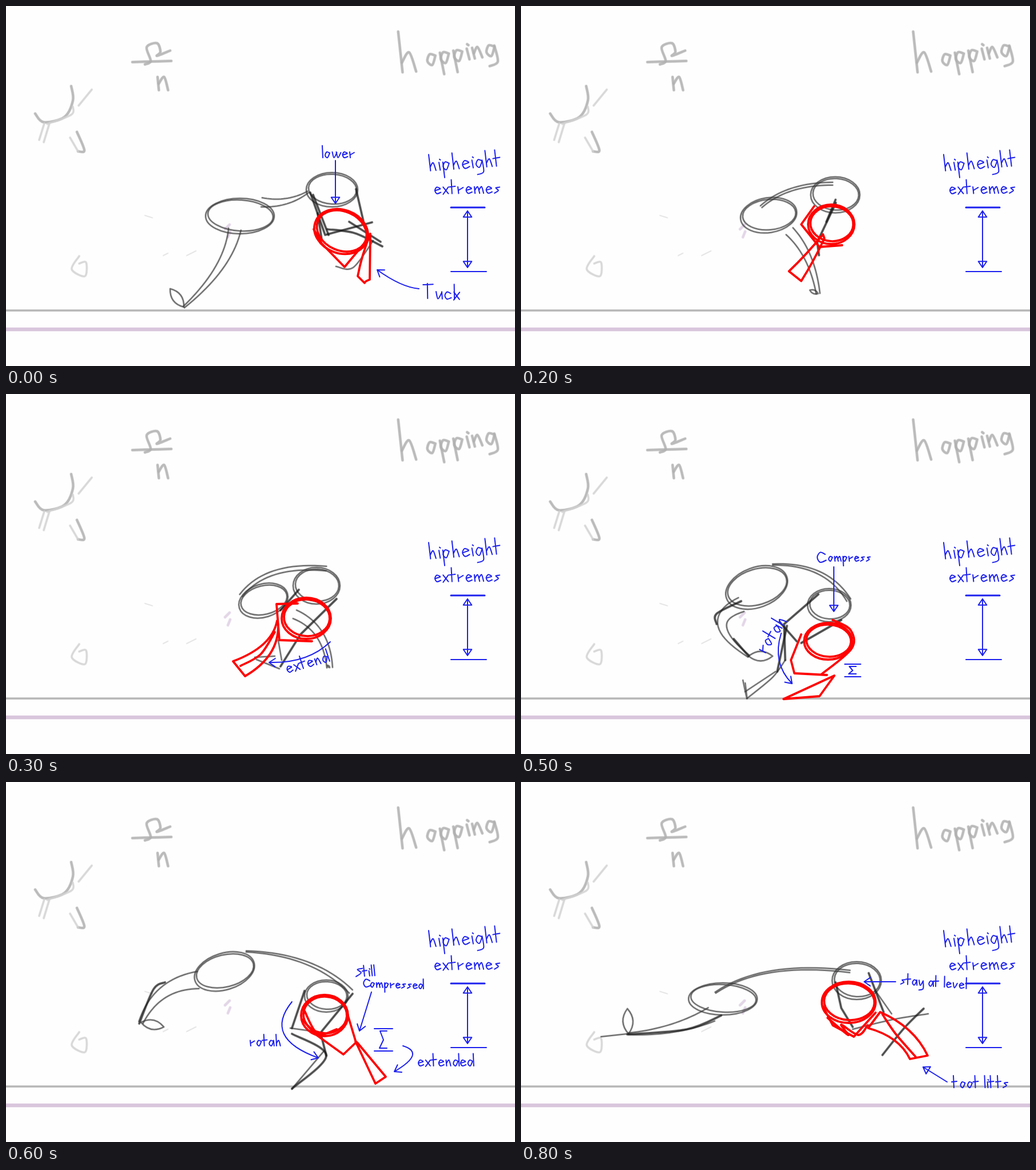
Recreate the animation shown at these times as an HTML page with a canvas. Size 890 by 629 pixels, loop 900 ms.

```html
<!DOCTYPE html>
<html lang="en">
<head>
<meta charset="utf-8">
<title>Hopping study</title>
<style>
html, body { margin: 0; width: 100%; height: 100%; overflow: hidden; background: #fefefe; }
canvas { display: block; width: 100%; height: 100%; }
</style>
</head>
<body>
<canvas id="stage" width="890" height="629" role="img" aria-label="Sketch of a hop cycle with handwritten notes"></canvas>
<script>
const ctx = document.getElementById('stage').getContext('2d');
const STEP = 100;

const pen = (color, width, soft = true) => ({ color, width, soft });
const PENCIL = pen('rgba(55,55,55,.82)', 2);
const DARK = pen('rgba(25,25,25,.85)', 3.2);
const FAINT = pen('#d2d2d2', 3);
const GREY = pen('#b0b0b0', 4);
const RED = pen('#ff0000', 3.8, false);
const BLUE = pen('#1c20ee', 2, false);

function ink(tool, path, scale = 1) {
  ctx.beginPath();
  path();
  ctx.strokeStyle = tool.color;
  ctx.lineWidth = tool.width / scale;
  ctx.globalAlpha = tool.soft ? .8 : 1;
  ctx.stroke();
  if (tool.soft) {
    ctx.lineWidth += 1.6 / scale;
    ctx.globalAlpha = .3;
    ctx.stroke();
  }
  ctx.globalAlpha = 1;
}

// Smooth curve through the points of each stroke, strokes split by "/"
function curve(tool, strokes, scale) {
  for (const stroke of strokes.split('/')) {
    const n = stroke.split(' ').map(Number);
    const at = i => {
      const k = Math.max(0, Math.min(n.length / 2 - 1, i));
      return [n[2 * k], n[2 * k + 1]];
    };
    ink(tool, () => {
      ctx.moveTo(...at(0));
      for (let i = 1; i < n.length / 2; i++) {
        const [o, a, b, c] = [at(i - 2), at(i - 1), at(i), at(i + 1)];
        ctx.bezierCurveTo(a[0] + (b[0] - o[0]) / 6, a[1] + (b[1] - o[1]) / 6,
          b[0] - (c[0] - a[0]) / 6, b[1] - (c[1] - a[1]) / 6, ...b);
      }
    }, scale);
  }
}

function line(tool, n) {
  ink(tool, () => {
    for (let i = 0; i < n.length; i += 2) ctx.lineTo(n[i], n[i + 1]);
  });
}

function ring(tool, [x, y, rx, ry, turn]) {
  ink(tool, () => ctx.ellipse(x, y, rx, ry, turn, 0, 7));
  ink(tool, () => ctx.ellipse(x + 1, y - 1, rx - 3, ry - 4, turn + .06, 0, 7));
}

// Two sides of a tapering limb bent through its middle point
function limb(tool, [x0, y0, mx, my, x1, y1, w0, w1]) {
  const cx = 2 * mx - (x0 + x1) / 2, cy = 2 * my - (y0 + y1) / 2;
  for (const side of [-.5, .5]) {
    ink(tool, () => {
      for (let t = 0; t <= 1.001; t += .05) {
        const u = 1 - t;
        const dx = u * (cx - x0) + t * (x1 - cx), dy = u * (cy - y0) + t * (y1 - cy);
        const w = side * (w0 * u + w1 * t) / Math.hypot(dx, dy);
        ctx.lineTo(u * u * x0 + 2 * u * t * cx + t * t * x1 - dy * w,
          u * u * y0 + 2 * u * t * cy + t * t * y1 + dx * w);
      }
    });
  }
}

// Closed blade whose long edges are both pushed by (sx, sy)
function blade(tool, [ax, ay, bx, by, cx, cy, dx, dy, sx, sy]) {
  ink(tool, () => {
    ctx.moveTo(ax, ay);
    ctx.quadraticCurveTo((ax + bx) / 2 + sx, (ay + by) / 2 + sy, bx, by);
    ctx.lineTo(cx, cy);
    ctx.quadraticCurveTo((cx + dx) / 2 + sx, (cy + dy) / 2 + sy, dx, dy);
    ctx.closePath();
  });
}

function paw(tool, x, y, [tx, ty]) {
  const nx = (ty - y) * .4, ny = (x - tx) * .4;
  ink(tool, () => {
    ctx.moveTo(x, y);
    ctx.quadraticCurveTo((x + tx) / 2 + nx, (y + ty) / 2 + ny, tx, ty);
    ctx.quadraticCurveTo((x + tx) / 2 - nx, (y + ty) / 2 - ny, x, y);
  });
}

function arrow([x0, y0, x1, y1, sx = 0, sy = 0, closed = false]) {
  const cx = (x0 + x1) / 2 + sx, cy = (y0 + y1) / 2 + sy;
  const turn = Math.atan2(y1 - cy, x1 - cx);
  const barb = a => [x1 - 13 * Math.cos(turn + a), y1 - 13 * Math.sin(turn + a)];
  ink(BLUE, () => {
    ctx.moveTo(x0, y0);
    ctx.quadraticCurveTo(cx, cy, x1, y1);
    ctx.moveTo(...barb(.6));
    ctx.lineTo(x1, y1);
    ctx.lineTo(...barb(-.6));
    if (closed) ctx.closePath();
  });
}

// Handwriting: a few pen parts on a baseline at 0 make up all letters
const PARTS = {
  bowl: '8 -8 3 -10 0 -4 4 0 8 -8', open: '8 -8 3 -10 0 -5 3 0 9 -2',
  left: '0 -10 1 0', right: '8 -10 9 0', tall: '0 -21 1 0', drop: '0 -10 1 10',
  hook: '8 -9 9 6 1 9', hump: '1 -5 5 -10 8 0', cup: '0 -10 3 0 8 -9',
  bar: '1 -5 8 -7', dot: '1 -14 2 -13', tick: '1 -5 8 -9', cross: '-3 -10 6 -11',
  slash: '8 -10 0 1', back: '0 -10 8 0', ess: '8 -9 2 -8 6 -4 0 0',
  belly: '0 -20 10 -11 0 0', roof: '-6 -19 8 -20'
};
const LETTERS = {
  a: 'bowl right', c: 'open', d: 'bowl tall>9', e: 'bar open', f: 'tall cross',
  g: 'bowl hook', h: 'tall hump', i: 'left dot', k: 'tall slash back', l: 'tall',
  m: 'left hump hump>6', n: 'left hump', o: 'bowl', p: 'drop bowl', r: 'left tick',
  s: 'ess', t: 'tall cross', u: 'cup right', v: 'cup', w: 'cup cup>7', x: 'back slash',
  y: 'cup hook', D: 'tall belly', T: 'tall roof'
};
const advance = c => 'il'.includes(c) ? 5 : 'mw'.includes(c) ? 18 : c === 't' ? 10 : 12.5;

function write([text, x, y, size = 1, turn = 0], tool = BLUE) {
  ctx.save();
  ctx.translate(x, y);
  ctx.rotate(turn);
  ctx.scale(size, size);
  for (const c of text) {
    const big = 'CS'.includes(c) ? 1.7 : 1;
    ctx.save();
    ctx.scale(big, big);
    for (const part of (LETTERS[big > 1 ? c.toLowerCase() : c] || '').split(' ').filter(Boolean)) {
      const [name, shift = 0] = part.split('>');
      ctx.save();
      ctx.translate(+shift, 0);
      curve(tool, PARTS[name], size * big);
      ctx.restore();
    }
    ctx.restore();
    ctx.translate(c === ' ' ? 7 : advance(c) * (big > 1 ? 1.25 : 1), 0);
  }
  ctx.restore();
}

function backdrop() {
  ctx.fillStyle = '#fefefe';
  ctx.fillRect(0, 0, 890, 629);
  write(['h', 690, 116, 3.4, -.06], GREY);
  write(['opping', 738, 104, 1.9, -.15], GREY);
  // margin doodles
  curve(GREY, '243 102 253 96 246 72 264 65 270 80 264 87 287 78/221 98 255 97 289 96');
  write(['n', 265, 147, 2.3], GREY);
  curve(GREY, '51 188 66 203 102 194 117 165 114 140/124 220 137 252 126 254');
  curve(FAINT, '72 206 114 190 117 176/150 146 127 174/67 205 58 234/76 205 66 238/112 230 126 254');
  curve(FAINT, '128 437 115 460 138 472 140 448 128 450');
  curve(pen('#dadada', 1.2), '243 366 256 370/275 436 283 432/316 436 332 428');
  curve(pen('#dfcfe3', 4), '383 390 391 382/388 404 392 394');
  // ground
  line(pen('#a8a8a8', 3), [0, 532, 890, 532]);
  line(pen('#d3bdd8', 6), [0, 565, 890, 565]);
}

function hipGauge() {
  write(['hipheight', 741, 288, 1.36, -.07]);
  write(['extremes', 750, 328, 1.15, -.01]);
  line(pen(BLUE.color, 3, false), [778, 352, 837, 352]);
  line(BLUE, [778, 464, 840, 464]);
  for (const y of [358, 457]) arrow([807, 408, 807, y, 0, 0, true]);
}

const tuck = {
  chest: [409, 367, 60, 31, 0], hip: [570, 321, 45, 30, 0],
  back: [447, 343, 490, 341, 528, 325, 16, 3],
  fore: [400, 390, 372, 458, 311, 526, 22, 3], paw: [287, 494],
  hind: [532, 326, 558, 400, 640, 378], outer: [612, 320, 627, 385],
  pelvis: [586, 394, 48, 38, .35], thigh: [538, 390, 552, 415, 592, 456, 632, 408],
  shin: [637, 398, 615, 472, 627, 484, 636, 478, -4, 0],
  dark: '537 330 564 400/545 362 552 408/562 390 610 397 658 420/600 377 655 412',
  pencil: '577 455 607 457 642 410',
  arrows: [[576, 270, 576, 345, 0, 0, true], [722, 494, 649, 461, 6, 14]],
  notes: [['lower', 553, 265], ['Tuck', 736, 511, 1.25, .03]]
};
const rotate = {
  chest: [416, 370, 55, 32, 0], hip: [556, 325, 45, 31, 0],
  back: [429, 349, 478, 329, 530, 316, 2, 2],
  fore: [434, 402, 455, 460, 473, 527, 18, 3], paw: [448, 519],
  hind: [523, 330, 521, 405, 562, 395], outer: [588, 335, 588, 376],
  pelvis: [560, 371, 38, 33, 0], thigh: [515, 334, 507, 396, 565, 412, 588, 404],
  shin: [582, 402, 540, 460, 562, 468, 585, 408, -26, -6],
  dark: '555 390 590 405 620 420/612 415 562 462/525 453 562 465',
  pencil: '540 405 605 428',
  red: '515 334 545 339 582 358/515 345 510 392',
  arrows: [[506, 417, 477, 345, -22, 8, true], [573, 458, 582, 474]],
  notes: [['rotah', 443, 403, 1, .56], ['Drag', 585, 466, 1, .08]]
};
const extend = {
  chest: [450, 361, 44, 29, -.3], hip: [543, 335, 41, 32, 0],
  back: [411, 352, 470, 312, 560, 305, 6, 8],
  fore: [505, 385, 548, 420, 566, 478, 16, 10], paw: [562, 474],
  hind: [578, 358, 515, 420, 480, 476], outer: [512, 342, 480, 378],
  pelvis: [525, 392, 43, 36, 0], thigh: [510, 366, 473, 367, 478, 430, 535, 432],
  shin: [474, 396, 397, 467, 418, 493, 476, 404, 30, 10],
  pencil: '435 460 470 458/438 464 478 480/476 430 482 465',
  red: '410 475 445 455 470 416',
  arrows: [[567, 433, 460, 469, 14, 20]],
  notes: [['extend', 493, 487, 1.08, -.27]]
};
const compress = {
  chest: [412, 338, 56, 35, -.35], hip: [539, 369, 38, 29, 0],
  back: [440, 298, 520, 312, 573, 360, 2, 8],
  fore: [385, 368, 352, 405, 398, 458, 26, 4], paw: [440, 458],
  hind: [520, 350, 460, 402, 462, 465], outer: [560, 395, 490, 435],
  pelvis: [537, 432, 42, 32, 0], thigh: [490, 420, 472, 465, 478, 488, 535, 491],
  shin: [548, 492, 459, 533, 522, 528, 548, 492, 0, 0],
  dark: '385 362 342 384 342 402/372 428 398 458/465 405 448 485/452 398 482 432',
  pencil: '462 465 440 495 395 532/445 485 392 520/388 500 395 532 392 505',
  red: '545 395 576 412 578 445 525 490',
  arrows: [[547, 302, 547, 380, 0, 0, true], [455, 418, 474, 506, -26, 8]],
  notes: [['C', 518, 294, 1.02], ['ompress', 538, 292, .82], ['rotah', 427, 453, 1.2, -.98]],
  bars: [566, 472, 594, 494]
};
const rebound = {
  chest: [382, 331, 54, 32, -.3], hip: [560, 374, 38, 28, 0],
  back: [420, 296, 525, 316, 603, 366, 2, 8],
  fore: [336, 346, 275, 368, 236, 420, 30, 8], paw: [276, 428],
  hind: [606, 370, 550, 438, 560, 478], outer: [522, 365, 500, 430],
  pelvis: [557, 408, 41, 36, 0], thigh: [518, 415, 540, 440, 590, 476, 612, 455],
  shin: [611, 453, 646, 527, 664, 515, 614, 455, 0, 0],
  dark: '278 350 258 362 233 422/500 440 560 478 500 536',
  pencil: '497 430 555 438/500 536 556 470',
  red: '597 405 612 455/522 400 545 440 578 432',
  arrows: [[500, 384, 546, 482, -74, 14], [639, 367, 618, 435], [694, 461, 679, 506, 48, -10]],
  notes: [['Still', 612, 340, .9, -.05], ['Compressed', 625, 358, .8, .03], ['rotah', 427, 461, .95], ['extended', 721, 496, 1.02]],
  bars: [644, 431, 676, 470]
};
const lift = {
  chest: [353, 379, 60, 28, 0], hip: [587, 347, 43, 33, 0],
  back: [340, 368, 440, 331, 575, 331, 2, 4],
  fore: [333, 406, 265, 430, 188, 440, 26, 3], paw: [186, 396],
  hind: [550, 350, 560, 395, 580, 428], outer: [608, 334, 634, 402],
  pelvis: [573, 385, 47, 36, 0], thigh: [528, 392, 545, 425, 582, 445, 620, 403],
  shin: [607, 430, 680, 484, 711, 478, 628, 402, 18, -12],
  dark: '704 396 670 430 632 477/350 408 290 432 186 441',
  pencil: '580 432 650 415 712 405/140 445 186 440/620 365 648 405',
  red: '536 412 572 442 560 424 590 442 606 425/632 406 655 440 690 480',
  arrows: [[655, 349, 600, 349], [745, 524, 703, 498, 0, 0, true]],
  notes: [['stay at level', 664, 353, .9, .07], ['foot lifts', 756, 534, 1]]
};

const BODY = ['chest', 'hip', 'back', 'fore', 'paw', 'hind', 'outer', 'pelvis', 'thigh', 'shin'];
const between = (a, b) => Object.fromEntries(
  BODY.map(k => [k, a[k].map((v, i) => (v + b[k][i]) / 2)]));

const CYCLE = [tuck, rotate, between(rotate, extend), extend, between(extend, compress),
  compress, rebound, between(rebound, lift), lift];

function figure(p) {
  ring(PENCIL, p.chest);
  ring(PENCIL, p.hip);
  limb(PENCIL, p.back);
  limb(PENCIL, p.fore);
  paw(PENCIL, p.fore[4], p.fore[5], p.paw);
  if (p.pencil) curve(PENCIL, p.pencil);
  line(DARK, p.hind);
  line(DARK, p.outer);
  if (p.dark) curve(DARK, p.dark);
  ring(RED, p.pelvis);
  line(RED, p.thigh);
  blade(RED, p.shin);
  if (p.red) curve(RED, p.red);
}

// Squashed spring between two short bars
function spring([x0, y0, x1, y1]) {
  line(BLUE, [x0, y0, x1, y0]);
  line(BLUE, [x0, y1, x1, y1]);
  const mid = (x0 + x1) / 2, h = y1 - y0;
  line(BLUE, [mid + 6, y0 + 4, mid - 6, y0 + 4, mid, y0 + h / 2, mid - 7, y1 - 5, mid + 6, y1 - 5]);
}

function paint(time) {
  const pose = CYCLE[Math.floor(time / STEP) % CYCLE.length];
  ctx.lineCap = ctx.lineJoin = 'round';
  backdrop();
  figure(pose);
  hipGauge();
  (pose.arrows || []).forEach(arrow);
  (pose.notes || []).forEach(note => write(note));
  if (pose.bars) spring(pose.bars);
}

const start = performance.now();
function tick() {
  paint(performance.now() - start);
  requestAnimationFrame(tick);
}
tick();
</script>
</body>
</html>
```
